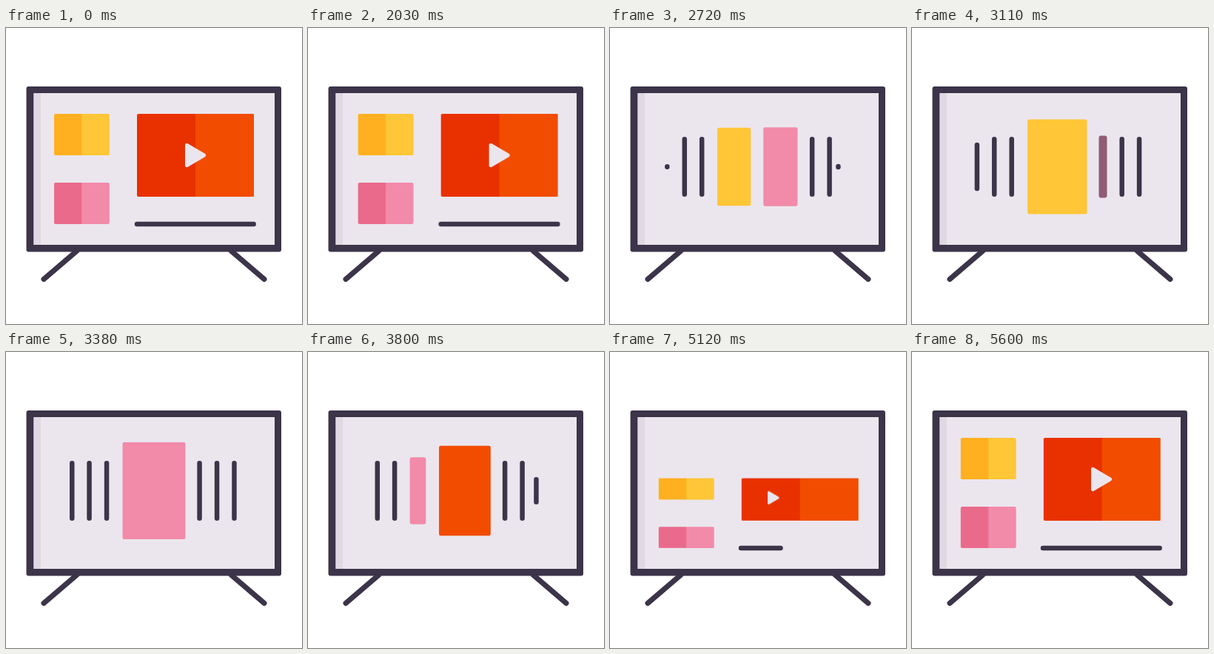
Write an HTML page without scripts that moves like this. It is 400 px wide and 400 px high and loops after 5630 ms.

```html
<!DOCTYPE html>
<html lang="en">
<head>
<meta charset="utf-8">
<title>TV gallery</title>
<style>
@property --k { syntax: "<number>"; inherits: true; initial-value: 0; }
@property --e { syntax: "<number>"; inherits: true; initial-value: 0; }

html, body { margin: 0; width: 100%; height: 100%; overflow: hidden; background: #fff; }
svg {
  display: block; width: 100vw; height: 100vh;
  --dark: #3c3449;
  --smooth: cubic-bezier(.333, 0, .667, 1);
  --out: cubic-bezier(.215, .61, .355, 1);
}
.page, .cards, .play, .bar, .lines, .pop, .item {
  animation: 5630ms var(--smooth) infinite;
}

/* Video page: slides away, then grows back */
.page { animation-name: slide; }
.cards { animation-name: grow; transform-origin: 0 228px; }
.cards.low { transform-origin: 0 265px; }
.play { animation-name: zoom; transform-origin: 177px 228px; }
.bar { animation-name: draw; stroke-dasharray: 158 400; }

@keyframes slide {
  0%, 35.77% { transform: none; visibility: visible; }
  41.39% { transform: translateX(310px); visibility: visible; }
  41.4%, 86.9% { transform: none; visibility: hidden; }
  87%, 100% { transform: none; visibility: visible; }
}
@keyframes grow {
  0%, 41.39% { transform: none; }
  41.4%, 87.39% { transform: translateX(.8px) scaleY(0); animation-timing-function: var(--out); }
  99.3%, 100% { transform: translateX(.8px) scaleY(1); }
}
@keyframes zoom {
  0%, 41.39% { transform: none; }
  41.4%, 87% { transform: scale(0); animation-timing-function: var(--out); }
  99.3%, 100% { transform: none; }
}
@keyframes draw {
  0%, 41.39% { stroke-dashoffset: 0; }
  41.4%, 88.45% { stroke-dashoffset: 165; animation-timing-function: var(--out); }
  99.3%, 100% { stroke-dashoffset: 0; }
}

/* Carousel: --k morphs a line into a card, --e shrinks a line to a dot */
.lines { animation-name: unfold; transform-origin: 200px 187.5px; }
.pop { animation-name: pop; transform-origin: 200px 187.5px; }
.item {
  x: var(--c);
  y: calc(147px - 25px * var(--k) + 37px * var(--e));
  width: calc(6.5px + 78.5px * var(--k));
  height: calc(81px + 50px * var(--k) - 74px * var(--e));
  rx: calc(3.25px - 1.25px * var(--k));
  fill: var(--dark);
  animation-name: rail;
}
.card {
  --kr: 0; --kc: 0; --kl: 0;
  fill: color-mix(in srgb, var(--hue) calc(min(1, var(--k) * 8) * 100%), var(--dark));
  animation-name: rail, morph;
}
.first, .last { --a: 0; --b: 1; }
.first.in, .last.in { --a: 1; --b: 0; }
.first { animation-name: rail, shrinkRight, showRight; }
.last { animation-name: rail, shrinkLeft, showLeft; }
.first, .last { animation-timing-function: var(--smooth), var(--smooth), step-end; }

@keyframes unfold {
  0%, 41.39% { transform: scaleY(0); }
  45.56%, 83.48% { transform: none; }
  87.5%, 100% { transform: scaleY(0); }
}
@keyframes pop {
  0%, 41.39% { transform: scale(0); }
  44.05% { transform: scale(1.32); }
  45.56%, 83.48% { transform: none; }
  86.15% { transform: scale(1.32); }
  87.92%, 100% { transform: scale(0); }
}
@keyframes rail {
  0%, 45.56% { x: var(--c); }
  51.15%, 54.44% { x: var(--r); }
  60.04%, 63.5% { x: var(--c); }
  69.09%, 76.29% { x: var(--l); }
  81.35%, 100% { x: var(--c); }
}
@keyframes morph {
  0%, 45.56% { --k: var(--kc); }
  51.15%, 54.44% { --k: var(--kr); }
  60.04%, 63.5% { --k: var(--kc); }
  69.09%, 76.29% { --k: var(--kl); }
  81.35%, 100% { --k: var(--kc); }
}
@keyframes shrinkRight {
  0%, 45.56% { --e: var(--a); }
  48.5% { --e: 1; }
  51.15%, 54.44% { --e: var(--b); }
  57.2% { --e: 1; }
  60.04%, 100% { --e: var(--a); }
}
@keyframes showRight {
  0% { opacity: calc(1 - var(--a)); }
  48.2% { opacity: 1; }
  48.7% { opacity: calc(1 - var(--b)); }
  57% { opacity: 1; }
  57.5%, 100% { opacity: calc(1 - var(--a)); }
}
@keyframes shrinkLeft {
  0%, 63.5% { --e: var(--a); }
  66.3% { --e: 1; }
  69.09%, 76.29% { --e: var(--b); }
  78.8% { --e: 1; }
  81.35%, 100% { --e: var(--a); }
}
@keyframes showLeft {
  0% { opacity: calc(1 - var(--a)); }
  66.1% { opacity: 1; }
  66.6% { opacity: calc(1 - var(--b)); }
  78.6% { opacity: 1; }
  79.1%, 100% { opacity: calc(1 - var(--a)); }
}
</style>
</head>
<body>
<svg viewBox="0 0 400 400">
  <defs>
    <clipPath id="screen"><rect x="37.5" y="88" width="325.5" height="205"/></clipPath>
    <rect id="tile" x="65" y="116" width="74.5" height="56" rx="2"/>
    <path id="half" d="M102.3 116h35.2a2 2 0 0 1 2 2v52a2 2 0 0 1-2 2h-35.2z"/>
  </defs>

  <path d="M96 301L51 339.5M304 301L349 339.5" stroke="#3c3449" stroke-width="7" stroke-linecap="round"/>
  <rect x="27.5" y="79" width="344.5" height="223.5" rx="3" fill="#3c3449"/>
  <rect x="37.5" y="88" width="325.5" height="205" fill="#ebe6ed"/>
  <rect x="37.5" y="88" width="9.5" height="205" fill="#e0d8e2"/>

  <g clip-path="url(#screen)">
    <g class="page">
      <g class="cards">
        <use href="#tile" fill="#ffb020"/>
        <use href="#half" fill="#ffc637"/>
        <rect x="177" y="116" width="158" height="112" rx="2" fill="#e93100"/>
        <path d="M256 116h77a2 2 0 0 1 2 2v108a2 2 0 0 1-2 2h-77z" fill="#f24c00"/>
      </g>
      <g class="cards low">
        <use href="#tile" y="93" fill="#ea6a8b"/>
        <use href="#half" y="93" fill="#f28aaa"/>
      </g>
      <path class="play" d="M244.5 158.3L267.5 172L244.5 185.7z" fill="#ebe6ed" stroke="#ebe6ed" stroke-width="5" stroke-linejoin="round"/>
      <path class="bar" d="M177 265H334.7" fill="none" stroke="#3c3449" stroke-width="6.5" stroke-linecap="round"/>
    </g>

    <g class="lines">
      <rect class="item first in" style="--l:62.4px;--c:62.4px;--r:86px"/>
      <rect class="item last" style="--l:62.4px;--c:86px;--r:109.3px"/>
      <rect class="item" style="--l:86px;--c:109.3px;--r:132.8px"/>
      <rect class="item card" style="--l:109.3px;--c:132.8px;--r:157.5px;--kr:1;--hue:#ffc637"/>
      <rect class="item card" style="--l:157.5px;--c:258.3px;--r:281.8px;--kl:1;--hue:#f24c00"/>
      <rect class="item" style="--l:258.3px;--c:281.8px;--r:305.2px"/>
      <rect class="item first" style="--l:281.8px;--c:305.2px;--r:305.2px"/>
      <rect class="item last in" style="--l:305.2px;--c:305.2px;--r:305.2px"/>
    </g>
    <g class="pop">
      <rect class="item card" style="--l:132.8px;--c:157.5px;--r:258.3px;--kc:1;--hue:#f28aaa"/>
    </g>
  </g>
</svg>
</body>
</html>
```
